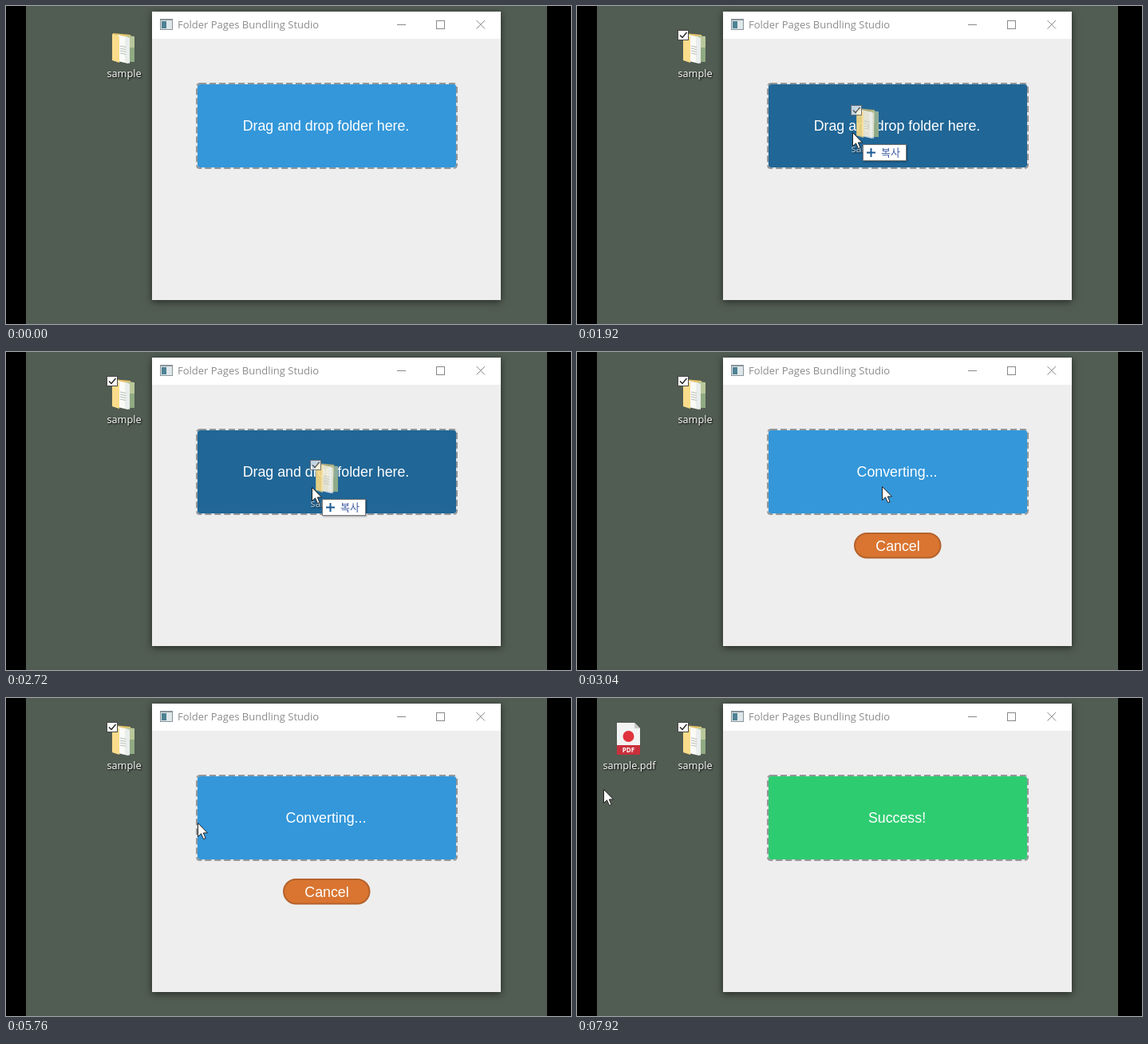
An HTML page with a canvas for the animation above (8000 ms loop, 708 px wide and 398 px high).

```html
<!DOCTYPE html>
<html lang="en">
<head>
<meta charset="utf-8">
<title>Drag and drop demo</title>
<style>
html, body { margin: 0; width: 100%; height: 100%; overflow: hidden; background: #000; }
canvas { display: block; }
</style>
</head>
<body>
<canvas id="stage" width="708" height="398"></canvas>
<script>
const ctx = document.getElementById('stage').getContext('2d');
const LOOP = 8000, STEP = 80;
const UI = '"Open Sans", "Noto Sans", sans-serif';
const CAPTION = '17.8px "Liberation Sans", Arial, sans-serif';
const BLUE = '#3397da';

// Moments when the scene changes
const ENTER = 560, HOVER = 1200, PRESS = 1520, DROP = 3040, DONE = 6960, SAVED = 7200;
const GRAB = { x: 128, y: 64 };

// Each move slows down towards its end point; between moves the pointer rests
const moves = [
  { from: ENTER, to: 960, x: 59, y: 125 },
  { from: 960, to: HOVER, x: 124, y: 73 },
  { from: HOVER, to: 1360, ...GRAB },
  { from: PRESS, to: 2240, x: 398, y: 181 },
  { from: 2480, to: 2800, x: 382, y: 168 },
  { from: 3360, to: 3600, x: 431, y: 179 },
  { from: 4560, to: 4640, x: 403, y: 167 },
  { from: 4640, to: 4720, x: 340, y: 173 },
  { from: 5120, to: 5760, x: 240, y: 156 },
  { from: 7600, to: 7920, x: 33, y: 114 }
];

function pointerAt(t) {
  let x = 189, y = 384;
  for (const m of moves) {
    const k = Math.min(1, Math.max(0, (t - m.from) / (m.to - m.from)));
    const eased = k * (2 - k);
    x += (m.x - x) * eased;
    y += (m.y - y) * eased;
  }
  return { x: Math.round(x), y: Math.round(y) };
}

function box(x, y, w, h, color) {
  ctx.fillStyle = color;
  ctx.fillRect(x, y, w, h);
}

function frame(x, y, w, h, color) {
  ctx.strokeStyle = color;
  ctx.lineWidth = 1;
  ctx.strokeRect(x + .5, y + .5, w - 1, h - 1);
}

function stroke(d, color, width = 1) {
  ctx.strokeStyle = color;
  ctx.lineWidth = width;
  ctx.stroke(new Path2D(d));
}

function fill(d, color) {
  ctx.fillStyle = color;
  ctx.fill(new Path2D(d));
}

// Upright sheet whose right side sits lower by `slant`
function sheet(x, y, w, h, slant, color) {
  fill(`M${x} ${y}l${w} ${slant}v${h}l${-w} ${-slant}z`, color);
}

function text(str, x, y, font, color, align = 'center') {
  ctx.font = font;
  ctx.textAlign = align;
  ctx.fillStyle = color;
  ctx.fillText(str, x, y);
}

// Draws with canvas settings that are undone afterwards
function using(settings, paint) {
  ctx.save();
  Object.assign(ctx, settings);
  paint();
  ctx.restore();
}

function iconLabel(str, x) {
  const shade = { shadowColor: '#000', shadowBlur: 2, shadowOffsetX: 1, shadowOffsetY: 1 };
  using(shade, () => text(str, x, 89, `12.7px ${UI}`, '#fff'));
}

function checkbox(checked) {
  box(126, 30, 14, 13, '#fff');
  frame(126, 30, 14, 13, '#444');
  if (checked) stroke('M129 36.5l3 3 5.5-6.5', '#222', 1.4);
}

function folder() {
  sheet(134, 34, 22, 34, 2, '#e5c56c');
  sheet(151, 37, 10, 32, 1, '#b9c79a');
  box(155, 52, 6, 18, '#8faa83');
  sheet(140, 36, 13, 33, 3, '#fafaf6');
  sheet(149, 38, 6, 32, 2, '#e9edeb');
  for (let y = 50; y < 61; y += 3) stroke(`M143 ${y}l7 1.5`, '#b7bdba');
  sheet(133, 35, 9, 33, 3, '#fadc8a');
  iconLabel('sample', 148);
}

function pdfFile() {
  fill('M50 31h22l7 7v33h-29z', '#f3f3f3');
  fill('M72 31l7 7h-7z', '#c9c9c9');
  box(50, 59, 29, 12, '#c9303c');
  text('PDF', 64.5, 68, `bold 8px ${UI}`, '#fff');
  ctx.beginPath();
  ctx.arc(64.5, 48, 7, 0, 2 * Math.PI);
  ctx.fillStyle = '#e0323c';
  ctx.fill();
  iconLabel('sample.pdf', 65.5);
}

function appWindow() {
  using({ shadowColor: 'rgba(0,0,0,.55)', shadowBlur: 9, shadowOffsetY: 2 },
    () => box(183, 7, 437, 361, '#eee'));
  box(183, 7, 437, 34, '#fff');
  box(193, 16, 16, 14, '#8b9499');
  box(194, 18, 14, 11, '#dfe7ea');
  box(195, 19, 6, 9, '#4e8294');
  text('Folder Pages Bundling Studio', 215, 28, `13px ${UI}`, '#8c8c8c', 'left');
  stroke('M490 23.5h11', '#888');
  frame(539, 18, 11, 11, '#888');
  stroke('M589.5 18l10.5 10.5m0-10.5l-10.5 10.5', '#888');
}

function dropArea(color, caption) {
  ctx.beginPath();
  ctx.roundRect(239, 97, 326, 106, 4);
  ctx.fillStyle = color;
  ctx.fill();
  ctx.lineWidth = 2;
  ctx.strokeStyle = '#e4e6e7';
  ctx.stroke();
  ctx.setLineDash([8, 4]);
  ctx.strokeStyle = '#949698';
  ctx.stroke();
  ctx.setLineDash([]);
  text(caption, 401, 156, CAPTION, '#fff');
}

function cancelButton() {
  ctx.beginPath();
  ctx.roundRect(348, 227, 107.5, 30.5, 15.2);
  ctx.fillStyle = '#d97531';
  ctx.fill();
  ctx.lineWidth = 2;
  ctx.strokeStyle = '#b4622c';
  ctx.stroke();
  text('Cancel', 402, 249, CAPTION, '#fff');
}

function pointer({ x, y }) {
  const arrow = `M${x + .5} ${y + .5}v17l4-3.7 3 6.7 2.6-1-2.8-6.6h5.2z`;
  fill(arrow, '#fff');
  stroke(arrow, '#222');
}

function copyHint(x, y) {
  using({ shadowColor: 'rgba(0,0,0,.35)', shadowBlur: 2, shadowOffsetX: 1, shadowOffsetY: 1 },
    () => box(x, y, 55, 21, '#fff'));
  frame(x, y, 55, 21, '#777');
  stroke(`M${x + 5} ${y + 10.5}h11m-5.5-5.5v11`, '#1b5a94', 2);
  text('복사', x + 35, y + 15, '13px "Noto Sans CJK KR", "Noto Sans CJK", sans-serif', '#3f5ca3');
}

function draw(t) {
  const at = pointerAt(t);
  const hovered = t >= HOVER && t < PRESS + STEP;
  const dragging = t >= PRESS + STEP && t < DROP;
  const overDrop = dragging && at.x > 239 && at.y > 96;

  box(0, 0, 708, 398, '#000');
  box(25, 0, 653, 398, '#515c52');
  if (hovered) {
    box(108, 28, 77, 67, '#5b7173');
    frame(108, 28, 77, 67, '#8199a0');
  }
  if (t >= SAVED) pdfFile();
  folder();
  if (t >= HOVER) checkbox(t >= PRESS);

  appWindow();
  if (t < DROP) dropArea(overDrop ? '#206696' : BLUE, 'Drag and drop folder here.');
  else if (t < DONE) {
    dropArea(BLUE, 'Converting...');
    cancelButton();
  } else dropArea('#2ecc71', 'Success!');

  if (dragging) using({ globalAlpha: .72 }, () => {
    ctx.translate(at.x - GRAB.x, at.y - GRAB.y);
    folder();
    checkbox(true);
  });
  if (t >= ENTER) pointer(at);
  if (overDrop) copyHint(at.x + 13, at.y + 15);
}

function tick() {
  const t = performance.now() % LOOP;
  draw(Math.floor(t / STEP) * STEP);
  requestAnimationFrame(tick);
}
tick();
</script>
</body>
</html>
```
